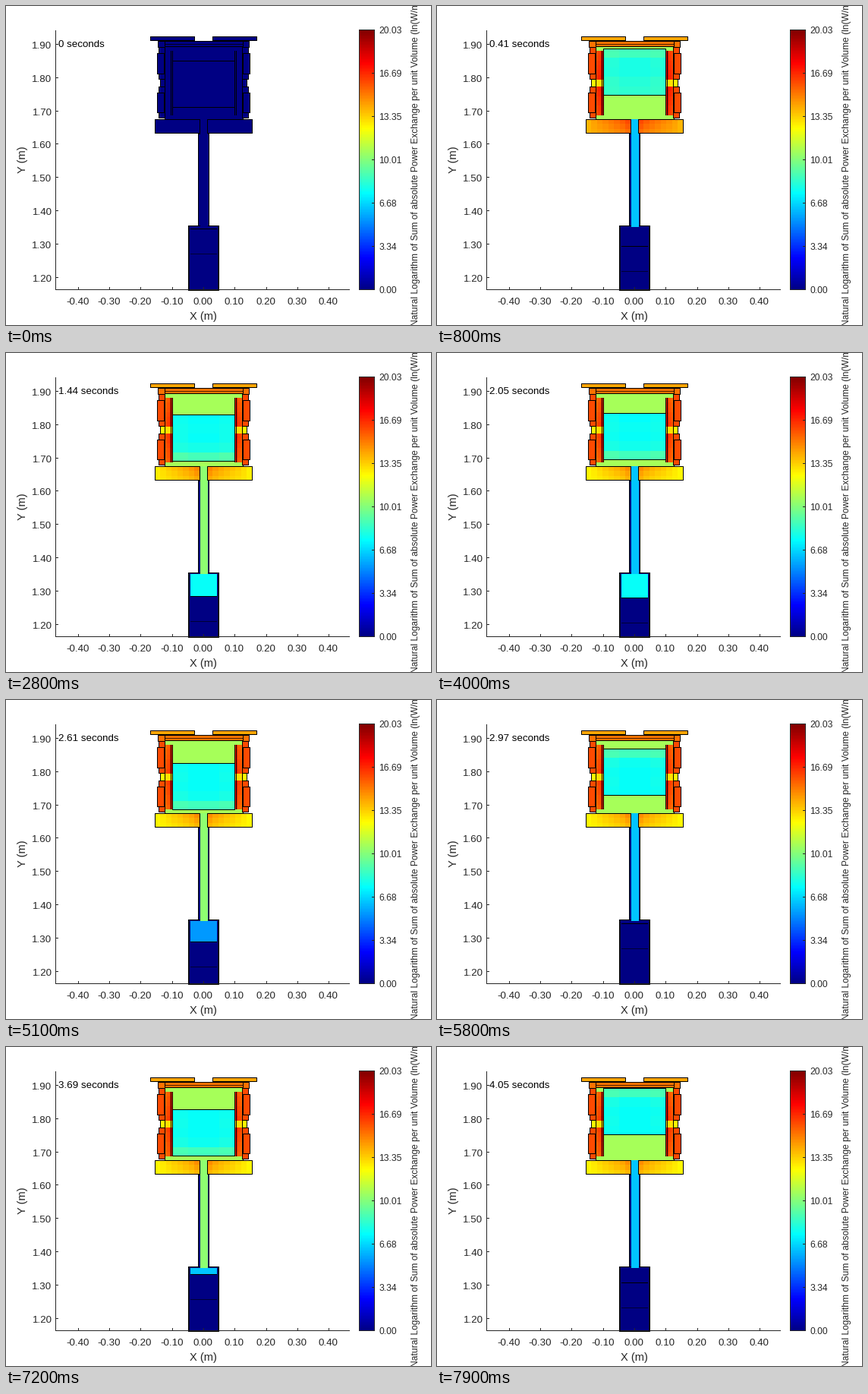
Recreate the animation shown at these times as a matplotlib script. Size 560x420 px, loop 8000 ms.

```python
import numpy as np
import matplotlib.pyplot as plt
from matplotlib.animation import FuncAnimation
from matplotlib.colors import LinearSegmentedColormap
from matplotlib.patches import Rectangle

W, H, DPI = 560, 420, 100
FRAMES, STEP = 80, 100
PX = 72 / DPI
INK = "#262626"

plt.rcParams["font.family"] = "Liberation Sans"
plt.rcParams["path.snap"] = False
jet = LinearSegmentedColormap.from_list("heat", [
    (0, (0, 0, .515)), (.121, (0, 0, 1)), (.371, (0, 1, 1)),
    (.621, (1, 1, 0)), (.873, (1, 0, 0)), (1, (.5, 0, 0))], N=256)

fig = plt.figure(figsize=(W / DPI, H / DPI), dpi=DPI, facecolor="white")
ax = fig.add_axes([0, 0, 1, 1])
ax.axis("off")
heated = []  # (patch, level) pairs that are cold only at the start


def line(xs, ys, color="black", z=5, alpha=1):
    return ax.plot(xs, ys, color=color, lw=PX, zorder=z, alpha=alpha,
                   solid_capstyle="butt")[0]


def label(x, y, s, size, ha="left", color=INK, rot=0):
    return ax.text(x, y, s, fontsize=size * PX, ha=ha, va="baseline",
                   color=color, rotation=rot, rotation_mode="anchor")


def frame(x0, y0, x1, y1, color="black", z=5):
    p = Rectangle((x0 + .5, y0 + .5), x1 - x0, y1 - y0, fill=False,
                  ec=color, lw=PX, zorder=z, joinstyle="miter")
    return ax.add_patch(p)


def box(x0, y0, x1, y1, level=0, edge=True, z=2):
    """Fill the pixels x0..x1, y0..y1, with an optional black rim."""
    p = Rectangle((x0, y0), x1 - x0 + 1, y1 - y0 + 1, fc=jet(level), lw=0, zorder=z)
    ax.add_patch(p)
    if edge:
        frame(x0, y0, x1, y1, z=z)
    heated.append((p, level))
    return p


def pair(x0, y0, x1, y1, level, edge=True, z=2):
    box(x0, y0, x1, y1, level, edge, z)
    box(520 - x1, y0, 520 - x0, y1, level, edge, z)


def field(x0, y0, x1, y1, z=3):
    return ax.imshow(np.zeros((2, 2)), extent=(x0, x1 + 1, y1 + 1, y0),
                     cmap=jet, vmin=0, vmax=1, aspect="auto",
                     interpolation="nearest", zorder=z)


# axes
line([65.5, 65.5], [32, 374], INK)
line([65, 453], [373.5, 373.5], INK)
for k in range(9):
    x = 95.5 + round(41.25 * k)
    line([x, x], [370, 374], INK)
    label(x - 1, 393, f"{-.4 + .1 * k + 1e-9:.2f}", 13.33, "center")
for k in range(8):
    y = 50.5 + round(43.8 * k)
    line([65, 69], [y, y], INK)
    label(60.5, y + 5.6, f"{1.9 - .1 * k:.2f}", 13.33, "right")
label(260, 413, "X (m)", 14.67, "center")
label(26, 202, "Y (m)", 14.67, "center", rot=90)

# colour bar
bar = field(465, 31, 485, 373)
bar.set_data(np.linspace(1, 0, 256)[:, None])
frame(465, 31, 485, 373, INK)
for k in range(7):
    y = 373.5 - 57 * k
    line([482, 486], [y, y], INK)
    label(491, y + 4.5, f"{20.03 * k / 6 - 1e-6:.2f}".replace("-", ""), 12)
label(543, 421, "Natural Logarithm of Sum of absolute Power Exchange "
      "per unit Volume (ln(W/m³))", 12, rot=90)

# housing and gas space
box(209, 46, 312, 149, .535)
box(209, 46, 312, 53, .76, z=4)
line([209, 312], [50.5, 50.5], alpha=.7)
pair(190, 40, 248, 45, .71, z=4)
pair(200, 46, 209, 54, .76)
for top, bottom in ((54, 96), (106, 147)):
    pair(201, top, 209, bottom, .8)
    pair(199, top + 8, 208, bottom - 7, .8)
pair(203, 96, 209, 106, .62)
pair(210, 96, 218, 106, .65, edge=False)

sides = [field(*b) for b in ((209, 59, 218, 96), (209, 106, 218, 143),
                             (302, 59, 311, 96), (302, 106, 311, 143))]
for x in (209.5, 217.5, 219.5, 301.5, 303.5, 311.5):
    line([x, x], [59, 144])
for y in (96.5, 106.5):
    line([203, 210], [y, y])
    line([311, 318], [y, y])

# displacer
body = field(219, 54, 301, 115)
edge = frame(219, 54, 301, 115)

# cold plate, duct and power cylinder
plates = [field(196, 149, 255, 167), field(265, 149, 324, 167)]
frame(196, 149, 255, 167)
frame(265, 149, 324, 167)
box(253, 168, 267, 290)
box(240, 289, 280, 374)
duct = box(256, 149, 265, 291, edge=False, z=4)
chamber = box(243, 291, 277, 324, edge=False, z=4)
crown = line([243, 278], [324, 324])
skirt = line([243, 278], [358, 358], alpha=.6)
for x in (241.5, 279.5):
    line([x, x], [290, 374], alpha=.6)
clock = label(69, 54, "", 13.33, color="black")

ax.set_xlim(0, W)
ax.set_ylim(H, 0)

ROW = np.linspace(-1, 1, 5)[:, None]
COL = np.abs(np.linspace(-1, 1, 4))[None, :]
SIDE = np.linspace(0, 1, 6)[:, None]
U = np.linspace(0, 1, 8)[None, :]
V = np.linspace(0, 1, 3)[:, None]


def update(i):
    on = i > 0
    angle = np.radians(186.6 - 30.8 * i - 12 * np.exp(-i / 5))
    s, c = np.sin(angle), np.cos(angle)
    warm = min(1, np.exp((17 - i) / 6))

    for p, level in heated:
        p.set_facecolor(jet(level * on))

    top = round(70 + 16 * s)
    body.set_extent((219, 302, top + 62, top))
    edge.set_y(top + .5)
    rim = ROW ** 2 * (.5 + .5 * ROW * np.sign(s))
    body.set_data(on * (.37 + .06 * rim + .015 * COL + .02 * warm * (1 + ROW)))

    red = on * (np.array([[.79, .81, .86]]) - .03 * SIDE + .03 * warm)
    for img, flip_y, flip_x in zip(sides, (1, 0, 1, 0), (0, 0, 1, 1)):
        data = red[::-1] if flip_y else red
        img.set_data(data[:, ::-1] if flip_x else data)

    plate = on * (.625 + .07 * warm + .04 * np.sin(3 * U) * (1 - .5 * V)
                  + .1 * U ** 3 * (1 - V / 3))
    plates[0].set_data(plate)
    plates[1].set_data(plate[:, ::-1])

    # gas colour switches with the direction of the piston
    limit = .35 if i < 20 else .66
    duct.set_facecolor(jet(on * (.51 if s > limit else .315)))
    gas = .375 - .8 * max(s - .7, 0)
    chamber.set_facecolor(jet(on * (gas if s > 0 else 0)))
    y = round(309 + 16 * c) + .5
    chamber.set_height(y - 291)
    crown.set_ydata([y, y])
    skirt.set_ydata([y + 33, y + 33])

    clock.set_text(f"{round(i * .05125 + 1e-9, 2):g} seconds")
    return []


anim = FuncAnimation(fig, update, frames=FRAMES, interval=STEP,
                     init_func=lambda: update(0), repeat=True, repeat_delay=0)
plt.show()
```
